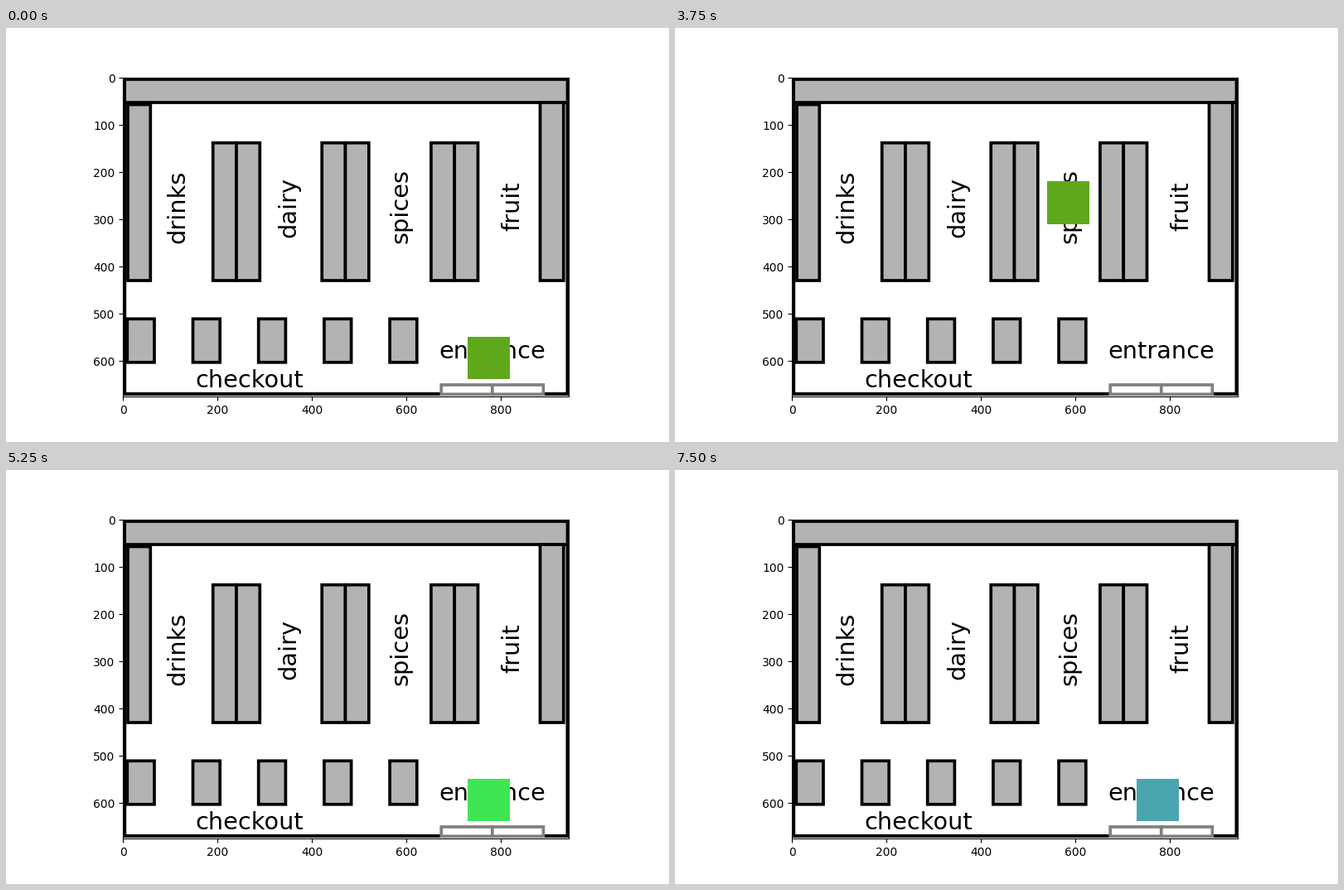
A matplotlib script that plays this animation: 800x500 px, repeating every 8000 ms.

```python
import matplotlib.pyplot as plt
from matplotlib.animation import FuncAnimation
from matplotlib.patches import Rectangle

WIDTH, HEIGHT, DPI = 800, 500, 100
INTERVAL, LOOP = 250, 8000
PT = 72 / DPI  # points per pixel
SHELF = "#b3b3b3"
TILE = 90

PLACES = {
    "entrance": (730, 550),
    "fruit": (770, 220),
    "spices": (540, 220),
    "dairy": (310, 220),
    "checkout": (203, 586),
}
FIRST, SECOND, THIRD = "#60a81b", "#3ee654", "#49a6af"

# start time in ms, place, customer colour
VISITS = [
    (0, "entrance", FIRST),
    (750, "spices", FIRST),
    (2250, "fruit", FIRST),
    (3750, "spices", FIRST),
    (4500, "checkout", FIRST),
    (5250, "entrance", SECOND),
    (6000, "dairy", SECOND),
    (6750, "checkout", SECOND),
    (7500, "entrance", THIRD),
]

fig = plt.figure(figsize=(WIDTH / DPI, HEIGHT / DPI), dpi=DPI, facecolor="white")

# floor plan, drawn in stage pixels
plan = fig.add_axes([0, 0, 1, 1], zorder=0)
plan.set_xlim(0, WIDTH)
plan.set_ylim(HEIGHT, 0)
plan.axis("off")


def box(x0, y0, x1, y1, fill=SHELF, edge="black", width=3.7):
    plan.add_patch(Rectangle((x0, y0), x1 - x0, y1 - y0, facecolor=fill,
                             edgecolor=edge, linewidth=width * PT,
                             joinstyle="miter", snap=False))


def label(x, y, text, rotation=0):
    plan.text(x, y, text, family="DejaVu Sans", size=28.8 * PT,
              rotation=rotation, rotation_mode="anchor",
              ha="left", va="baseline")


box(143.2, 62, 677.5, 442, fill="white", width=4)
box(143.2, 62, 677.5, 90)
box(147, 92.5, 174.3, 305)
box(644.5, 90, 672.8, 305)
for left in (249.7, 381.2, 512.9):
    box(left, 138.7, left + 28.3, 305)
    box(left + 28.3, 138.7, left + 56.6, 305)
for i in range(5):
    left = 146.3 + 79.2 * i
    box(left, 351.3, left + 32.7, 403.8)
for left in (525.2, 586.8):
    box(left, 431, left + 61.6, 442.3, fill="white", edge="#808080")

label(215, 259.6, "drinks", 90)
label(349.3, 252.6, "dairy", 90)
label(485, 260.4, "spices", 90)
label(619, 244.6, "fruit", 90)
label(522.4, 398.6, "entrance")
label(228, 434, "checkout")

# axes in map units, with the customer
ax = fig.add_subplot(111, zorder=1)
ax.patch.set_visible(False)
ax.set_aspect("equal")
ax.set_xlim(-0.5, 943.5)
ax.set_ylim(675.5, -0.5)
ax.set_xticks(range(0, 801, 200))
ax.set_yticks(range(0, 601, 100))
customer = ax.add_patch(Rectangle((0, 0), TILE, TILE, linewidth=0))


def update(frame):
    now = frame * INTERVAL
    _, place, color = [visit for visit in VISITS if visit[0] <= now][-1]
    x, y = PLACES[place]
    customer.set_xy((x - 0.5, y - 0.5))
    customer.set_facecolor(color)
    return [customer]


anim = FuncAnimation(fig, update, frames=LOOP // INTERVAL, interval=INTERVAL,
                     repeat=True, repeat_delay=0, blit=False)
plt.show()
```
